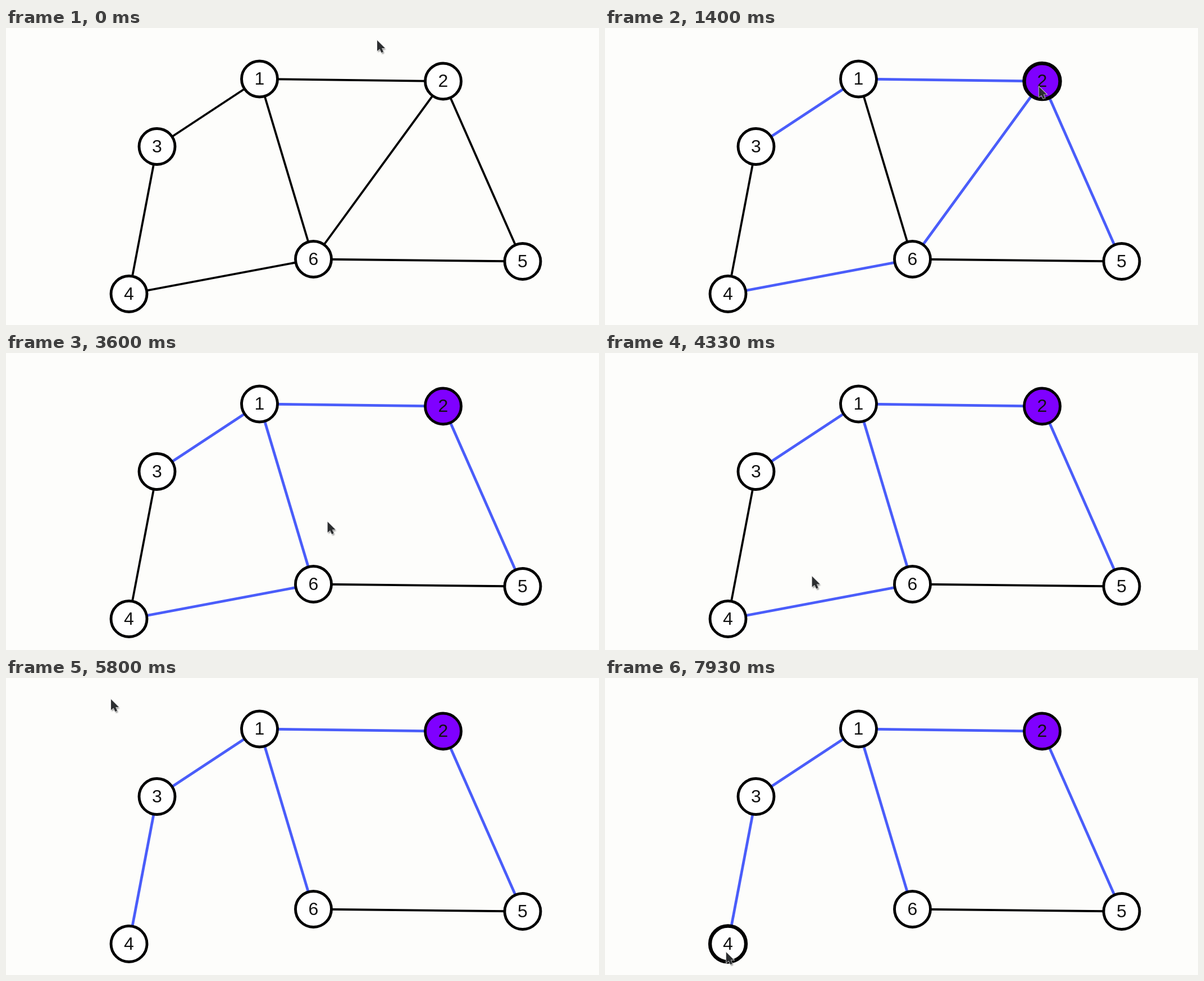
Write an HTML page that moves like this. It is 1056x530 px and loops after 8 s.

```html
<!DOCTYPE html>
<html lang="en">
<head>
<meta charset="utf-8">
<title>Spanning tree demo</title>
<style>
html, body { margin: 0; width: 100%; height: 100%; overflow: hidden; background: #fdfdfb; }
svg { display: block; width: 1056px; height: 530px; }
text { font: 32px "Liberation Sans", Arial, sans-serif; text-anchor: middle; fill: #111; }
circle { stroke: #000; }
</style>
</head>
<body>
<svg viewBox="0 0 1056 530">
  <defs>
    <filter id="soft" x="-60%" y="-60%" width="220%" height="220%">
      <feGaussianBlur stdDeviation="1.3"/>
    </filter>
    <path id="arrow" d="M0 0V19L4.5 15.5L7.5 22L11 20.5L8.2 14H14Z"/>
  </defs>
  <g id="edges"></g>
  <g id="nodes"></g>
  <g id="cursor">
    <use href="#arrow" x="1.5" y="2.5" opacity=".45" filter="url(#soft)"/>
    <use href="#arrow" fill="#2c2e30" stroke="#e8e8e8" stroke-width="1.4" style="paint-order: stroke"/>
  </g>
</svg>
<script>
const LOOP = 8000, STEP = 1000 / 15;
const BLACK = '#000', BLUE = '#4a5dfa', PURPLE = '#7f00ff', WHITE = '#fff';
const PICK = 1200, CUT_A = 3130, CUT_B = 4660; // click times

const nodes = {
  1: [451.5, 91], 2: [778.5, 95], 3: [269, 211.5],
  4: [219, 474.5], 5: [920, 416.5], 6: [547.5, 412.5]
};

// ends, time it turns blue, time it is removed
const edges = [
  ['12', PICK], ['13', PICK], ['25', PICK],
  ['26', PICK, CUT_A], ['46', PICK, CUT_B],
  ['16', CUT_A], ['34', CUT_B], ['56', Infinity]
];

// where the pointer rests or turns: time, x, y
const path = [
  [0, 661, 22], [1130, 772, 103], [1750, 773, 106],
  [2870, 645, 277], [3200, 644, 278], [4330, 369, 398],
  [4600, 353, 446], [5500, 203, 33], [5800, 187, 38],
  [6930, 20, 290], [7200, 106, 406], [LOOP, 217, 490]
];

function make(tag, parent, attrs) {
  const el = document.createElementNS('http://www.w3.org/2000/svg', tag);
  for (const k in attrs) el.setAttribute(k, attrs[k]);
  return document.getElementById(parent).appendChild(el);
}

const lines = edges.map(([ends]) => {
  const [[x1, y1], [x2, y2]] = [...ends].map(id => nodes[id]);
  return make('line', 'edges', { x1, y1, x2, y2 });
});

const rings = {};
for (const id in nodes) {
  const [x, y] = nodes[id];
  rings[id] = make('circle', 'nodes', { cx: x, cy: y, r: 32 });
  make('text', 'nodes', { x, y: y + 10 }).textContent = id;
}

const slope = (i, axis) =>
  (path[i + 1][axis] - path[i][axis]) / (path[i + 1][0] - path[i][0]);

// shape-preserving tangent, so the pointer never overshoots a point
function tangent(i, axis) {
  if (i === 0 || i === path.length - 1) return 0;
  const a = slope(i - 1, axis), b = slope(i, axis);
  return a * b <= 0 ? 0 : 2 * a * b / (a + b);
}

function pointAt(t) {
  const i = path.findLastIndex(p => p[0] <= t);
  const span = path[i + 1][0] - path[i][0];
  const u = (t - path[i][0]) / span, v = 1 - u;
  return [1, 2].map(axis =>
    v * v * (1 + 2 * u) * path[i][axis] +
    u * u * (3 - 2 * u) * path[i + 1][axis] +
    span * u * v * (v * tangent(i, axis) - u * tangent(i + 1, axis)));
}

const cursor = document.getElementById('cursor');

function draw(ms) {
  const t = Math.floor((ms % LOOP + 5) / STEP) * STEP % LOOP;
  const [x, y] = pointAt(t);
  cursor.setAttribute('transform', `translate(${x.toFixed(1)} ${y.toFixed(1)})`);

  edges.forEach(([, lit, cut = Infinity], i) => {
    const on = t >= lit;
    lines[i].setAttribute('stroke', on ? BLUE : BLACK);
    lines[i].setAttribute('stroke-width', on ? 4.8 : 3.8);
    lines[i].setAttribute('visibility', t < cut ? 'visible' : 'hidden');
  });

  for (const id in nodes) {
    const [cx, cy] = nodes[id];
    const hover = Math.hypot(x - cx, y - cy) < 34;
    rings[id].setAttribute('stroke-width', hover ? 6.4 : 4.9);
    rings[id].setAttribute('fill', id === '2' && t >= PICK ? PURPLE : WHITE);
  }
}

const start = performance.now();
function tick() {
  draw(performance.now() - start);
  requestAnimationFrame(tick);
}
draw(0);
requestAnimationFrame(tick);
</script>
</body>
</html>
```
